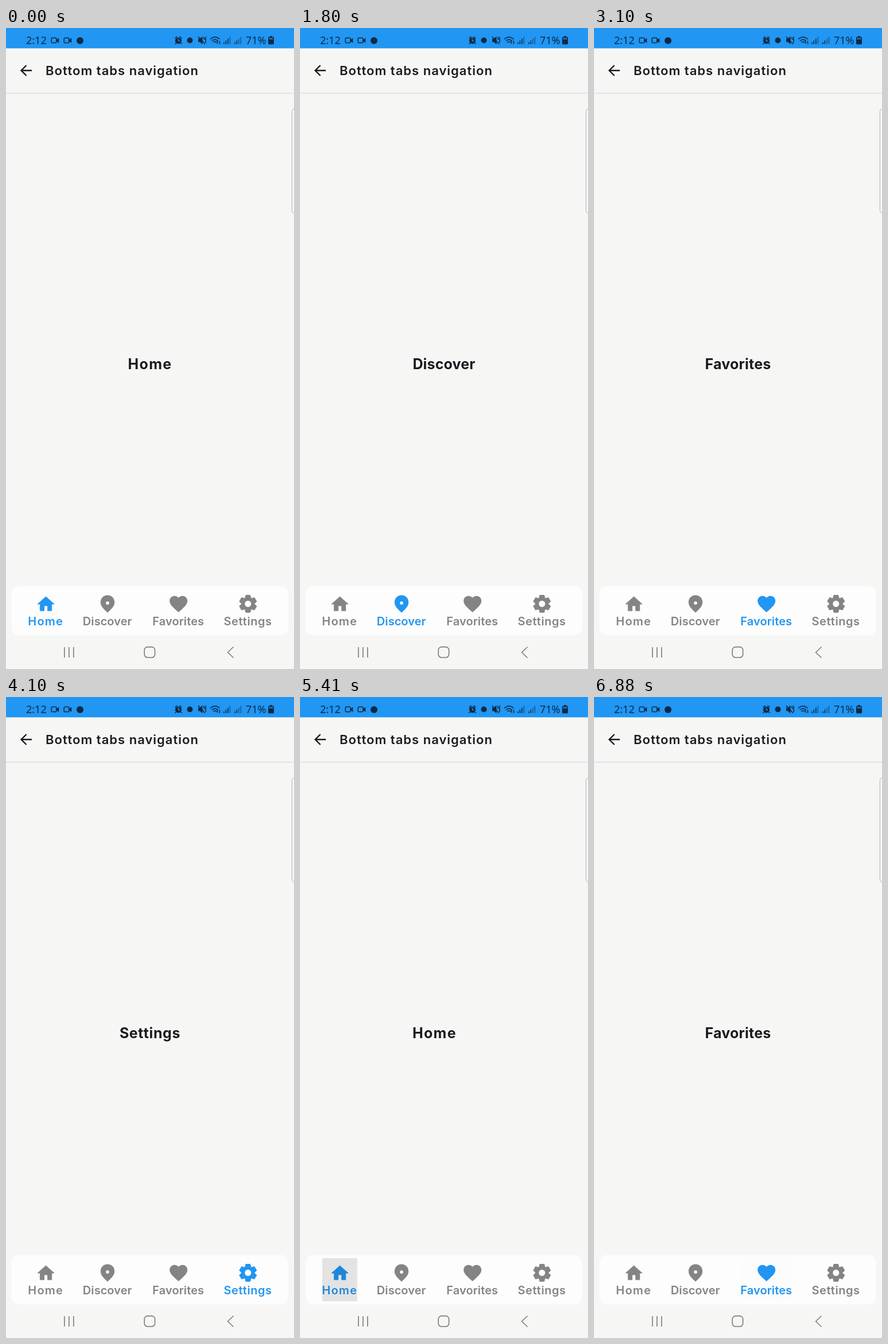
Write an HTML page that moves like this. It is 502x1116 px and loops after 6.91 s.

```html
<!DOCTYPE html>
<html lang="en">
<head>
<meta charset="utf-8">
<title>Bottom tabs navigation</title>
<style>
  html, body { margin: 0; width: 100%; height: 100%; overflow: hidden; background: #f6f6f5; }
  svg { display: block; width: 100vw; height: 100vh; }
  text { font-family: Inter, "Open Sans", sans-serif; }
  .status { font: 18px "Noto Sans", sans-serif; fill: #0d2a45; }
  .ink { fill: #0d2a45; }
  .line { fill: none; stroke: #0d2a45; stroke-width: 1.5; }
  .header { font-size: 22px; font-weight: 600; letter-spacing: 1px; fill: #1b1a1e; }
  .page { font-size: 25px; font-weight: 700; fill: #1b1a1e; text-anchor: middle; }
  .label { font-size: 20px; font-weight: 600; text-anchor: middle; }
  .nav { fill: none; stroke: #7b7b7b; stroke-width: 1.6; stroke-linejoin: round; }
</style>
</head>
<body>
<svg id="stage" viewBox="0 0 502 1116" xmlns="http://www.w3.org/2000/svg">
  <rect width="502" height="1116" fill="#f6f6f5"/>
  <g id="pages"></g>

  <rect width="502" height="35.4" fill="#2196f3"/>
  <g id="status">
    <text class="status" x="35" y="28">2:12</text>
    <g id="camera">
      <rect class="line" x="79.2" y="17.2" width="8.6" height="8.6" rx="1.2"/>
      <path class="ink" d="M88 20.5l4.2-3v8.6l-4.2-3z"/>
    </g>
    <use href="#camera" x="22"/>
    <circle class="ink" cx="129" cy="22" r="6"/>
    <circle class="ink" cx="300.5" cy="22" r="5.6"/>
    <path class="line" d="M294.5 18l4-3.2M306.5 18l-4-3.2M296.5 26l-2 2M304.5 26l2 2"/>
    <path d="M300.5 18.5v4h2.6" fill="none" stroke="#2196f3" stroke-width="1.3"/>
    <circle class="ink" cx="320.5" cy="21.5" r="5"/>
    <path class="ink" d="M335 18.5h3.2l4.3-4v14l-4.3-4H335z"/>
    <path class="line" d="M335 15l12 13M344.5 18l3.5 3M345 15.5v4M348 15v11"/>
    <path class="line" d="M356 19.5q8.3-7.5 16.6 0M358.8 22.5q5.5-4.8 11 0M361.5 25.2q2.7-2.2 5.5 0"/>
    <path class="line" d="M368.5 22v5.5M372.5 28v-5.5"/>
    <g id="bars"></g>
    <text class="status" x="418" y="28">71%</text>
    <path class="ink" d="M460 14h4v1.5h1.5q1.5 0 1.5 1.5v10q0 1.5-1.5 1.5h-7q-1.5 0-1.5-1.5v-10q0-1.5 1.5-1.5h1.5z"/>
    <rect x="458.5" y="17" width="7" height="3" fill="#1f6fb2"/>
  </g>

  <path d="M45 74H27M35.5 65L26.5 74l9 9" fill="none" stroke="#1b1a1e" stroke-width="2.4"/>
  <text class="header" x="69" y="82">Bottom tabs navigation</text>
  <path d="M0 113.5H502" stroke="#dddde4" stroke-width="1.5"/>
  <rect x="498.5" y="140.5" width="12" height="182" rx="5" fill="#fbfbfb" stroke="#a9a9a9"/>

  <rect x="9.5" y="971.5" width="482.5" height="86" rx="14" fill="#fdfdfd"/>
  <g id="tabs"></g>

  <g class="nav">
    <path d="M101.8 1078v18M109.8 1078v18M117.8 1078v18"/>
    <rect x="241.2" y="1077.6" width="18.4" height="18.4" rx="5.5"/>
    <path d="M396.5 1077.5l-10 9.5 10 9.5"/>
  </g>
</svg>
<script>
const LOOP = 6910, WIDTH = 502;
const BLUE = '#2196f3', GREY = '#848484';
const SLIDE = 500, HIGHLIGHT_DELAY = 90;
const PRESS_LEAD = 105, GROW = 225, HOLD = 425, FADE = 150;

// Icons are drawn around their own centre.
const tooth = 'M-5.3-9l1.5-6h7.6l1.5 6z';
const gear = '<circle r="8.4" fill="none" stroke="currentColor" stroke-width="5.8"/>' +
  [0, 60, 120, 180, 240, 300].map(a =>
    `<path d="${tooth}" transform="rotate(${a})" stroke="currentColor" stroke-linejoin="round"/>`).join('');

const tabs = [
  { name: 'Home', x: 69.2, w: 61, track: 1.2, icon:
    '<path transform="translate(-17.5 -16.9) scale(1.46)" stroke="currentColor" stroke-width=".5" stroke-linejoin="round" d="M10 20v-6h4v6h5v-8h3L12 3 2 12h3v8z"/>' },
  { name: 'Discover', x: 176.7, w: 86, track: .05, icon:
    '<path fill-rule="evenodd" d="M0-15c-7 0-12.2 5.3-12.2 12.2 0 7.5 6.2 12.3 12.2 18.2 6-5.9 12.2-10.7 12.2-18.2C12.2-9.7 7-15 0-15zM0-4.3a2.9 2.9 0 1 1 0 5.8 2.9 2.9 0 0 1 0-5.8z"/>' },
  { name: 'Favorites', x: 300.2, w: 92, track: .1, icon:
    '<path transform="translate(-18.4 -18.3) scale(1.55)" d="M12 21.35l-1.45-1.32C5.4 15.36 2 12.28 2 8.5 2 5.42 4.42 3 7.5 3c1.74 0 3.41.81 4.5 2.09C13.09 3.81 14.76 3 16.5 3 19.58 3 22 5.42 22 8.5c0 3.78-3.4 6.86-8.55 11.54z"/>' },
  { name: 'Settings', x: 421.5, w: 84, track: .5, icon: gear }
];

// Each tap: when the slide starts, and the tab it leads to.
const taps = [[1250, 1], [2286, 2], [3480, 3], [5114, 0], [6415, 2]];

const byId = id => document.getElementById(id);
const clamp = v => Math.min(1, Math.max(0, v));
const quintOut = u => 1 - (1 - u) ** 5;
const quadOut = u => 1 - (1 - u) ** 2;

byId('bars').innerHTML = [379, 398].map((x, n) =>
  [0, 1, 2, 3].map(i => {
    const h = 3 + i * 3.2;
    const opacity = i > 2 - n ? .5 : .9;
    return `<rect class="ink" x="${x + i * 3.5}" y="${28 - h}" width="1.7" height="${h}" opacity="${opacity}"/>`;
  }).join('')).join('');

byId('pages').innerHTML = tabs.map((t, i) =>
  `<text class="page" x="${251 + i * WIDTH}" y="594" letter-spacing="${t.track + .1}">${t.name}</text>`).join('');

byId('tabs').innerHTML = tabs.map((t, i) => `
  <clipPath id="clip${i}"><rect x="${t.x - t.w / 2}" y="977" width="${t.w}" height="75"/></clipPath>
  <g class="tab" fill="currentColor">
    <g transform="translate(${t.x + .3} 1002.5)">${t.icon}</g>
    <text class="label" x="${t.x}" y="1040" letter-spacing="${t.track}">${t.name}</text>
  </g>
  <g clip-path="url(#clip${i})"><circle class="ripple" cx="${t.x - 2.7}" cy="1014.5" r="0"/></g>`).join('');

const tabNodes = [...document.querySelectorAll('.tab')];
const ripples = [...document.querySelectorAll('.ripple')];

function draw(time) {
  let position = 0, from = 0, active = 0;
  const glow = tabs.map(() => ({ r: 0, opacity: 0 }));

  for (const [start, to] of taps) {
    if (time >= start) position = from + (to - from) * quintOut(clamp((time - start) / SLIDE));
    if (time >= start + HIGHLIGHT_DELAY) active = to;
    from = to;

    const held = time - start + PRESS_LEAD;
    if (held >= 0 && held < HOLD + FADE) {
      const reach = Math.hypot(tabs[to].w / 2, 37.5) + 1.5;
      glow[to] = {
        r: reach * quadOut(clamp(held / GROW)),
        opacity: .1 * clamp(held / 75) * (1 - clamp((held - HOLD) / FADE))
      };
    }
  }

  byId('pages').setAttribute('transform', `translate(${-position * WIDTH} 0)`);
  tabNodes.forEach((node, i) => node.style.color = i === active ? BLUE : GREY);
  ripples.forEach((node, i) => {
    node.setAttribute('r', glow[i].r);
    node.setAttribute('opacity', glow[i].opacity);
  });
}

const begin = performance.now();
function frame() {
  draw((performance.now() - begin) % LOOP);
  requestAnimationFrame(frame);
}
frame();
</script>
</body>
</html>
```
